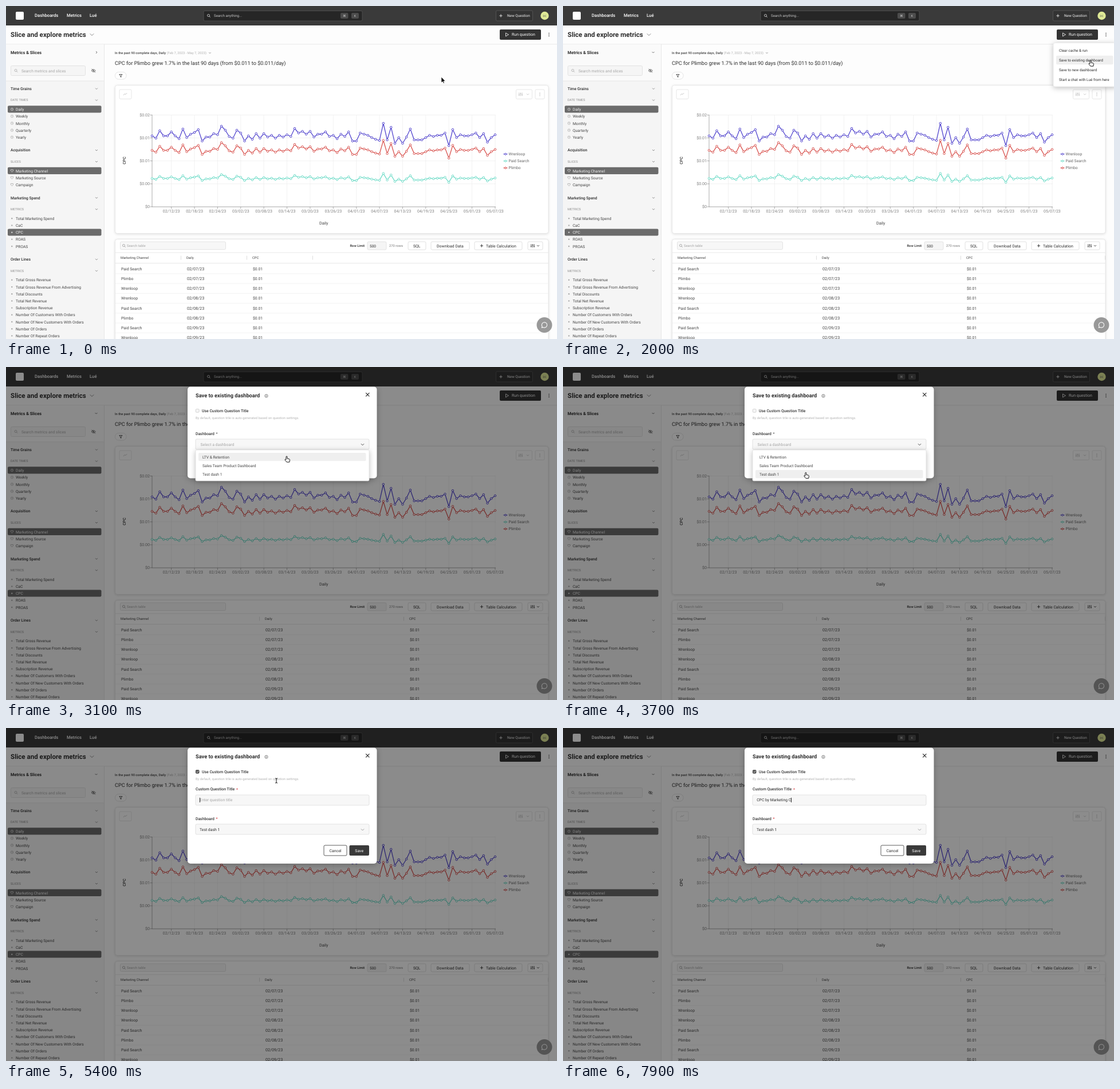
An HTML page for the animation above (8 s loop, 962x582 px).

```html
<!DOCTYPE html>
<html lang="en">
<head>
<meta charset="utf-8">
<title>Save to dashboard</title>
<style>
html, body { margin: 0; width: 100%; height: 100%; overflow: hidden; background: #fff; }
svg { display: block; }
text { font-family: Roboto, Inter, sans-serif; white-space: pre; text-rendering: geometricPrecision; }
.card { filter: drop-shadow(0 1px 2px rgba(0,0,0,.12)); }
.pop { filter: drop-shadow(0 2px 5px rgba(0,0,0,.25)); }
</style>
</head>
<body>
<svg id="stage" width="962" height="582" viewBox="0 0 962 582"></svg>
<script>
const INK = '#2d2d2d', GREY = '#a5a5a5', LINE = '#e2e2e2';

// y is the middle of the capital letters
const T = (s, x, y, size = 6.75, fill = '#454545', weight = 400, anchor = 'start') =>
  `<text x="${x}" y="${y + size * .355}" font-size="${size}" fill="${fill}" font-weight="${weight}" text-anchor="${anchor}">${s.replace('&', '&amp;')}</text>`;
const R = (x, y, w, h, fill, stroke = 'none', rx = 2, cls = '') =>
  `<rect x="${x}" y="${y}" width="${w}" height="${h}" rx="${rx}" fill="${fill}" stroke="${stroke}" stroke-width=".8" class="${cls}"/>`;
const P = (d, stroke, width = .8, fill = 'none') =>
  `<path d="${d}" stroke="${stroke}" stroke-width="${width}" fill="${fill}"/>`;
const C = (x, y, r, fill, stroke = 'none', width = .8) =>
  `<circle cx="${x}" cy="${y}" r="${r}" fill="${fill}" stroke="${stroke}" stroke-width="${width}"/>`;
const G = (id, body) => `<g id="${id}">${body}</g>`;

const chevron = (x, y, c = '#777', s = 2) => P(`M${x - s} ${y - s / 2}l${s} ${s} ${s} ${-s}`, c);
const lens = (x, y, c) => C(x, y, 2, 'none', c) + P(`M${x + 1.5} ${y + 1.5}l1.8 1.8`, c);
const kebab = (x, y, c) => [-2.4, 0, 2.4].map(d => C(x, y + d, .75, c)).join('');
const plus = (x, y, c) => P(`M${x - 2.6} ${y}h5.2M${x} ${y - 2.6}v5.2`, c, .9);
const sliders = (x, y, c) => P(`M${x - 2.6} ${y - 3}v6M${x} ${y - 3}v6M${x + 2.6} ${y - 3}v6M${x - 3.6} ${y + 1}h2M${x - 1} ${y - 1}h2M${x + 1.6} ${y + 1}h2`, c);

function header() {
  return R(0, 0, 962, 34, '#3a3a3a', 'none', 0) + R(17, 10, 14, 14, '#fff')
    + T('Dashboards', 50, 16.5, 7.7, '#fff', 500) + T('Metrics', 106, 16.5, 7.7, '#fff', 500)
    + T('Lué', 146, 16.5, 7.7, '#fff', 500)
    + R(345, 8.5, 277, 17.5, '#262626', '#555') + lens(353.5, 16.5, '#ddd')
    + T('Search anything...', 363, 17, 6.2, '#c4c4c4')
    + R(584, 12, 13.5, 10, '#4c4c4c') + R(603, 12, 13, 10, '#4c4c4c')
    + T('⌘', 590.7, 17, 5.5, '#ccc', 400, 'middle') + T('K', 609.5, 17, 5.2, '#ccc', 400, 'middle')
    + R(855.5, 8, 64, 18, '#333', '#595959') + plus(864, 17, '#eee') + T('New Question', 875, 17, 6.4, '#f2f2f2')
    + C(940.5, 17, 7.2, '#dfe996') + T('DC', 940.5, 17, 4.6, '#555', 400, 'middle')
    + T('Slice and explore metrics', 8, 50, 11.6, INK, 600) + chevron(150, 50, '#666', 3.2)
    + R(862, 41, 72, 18, '#333') + P('M872.5 47l5 3-5 3z', '#fff') + T('Run question', 883, 50, 7, '#fff', 400)
    + kebab(948, 50, '#333') + P('M0 66.8H962', LINE);
}

const sections = [
  [144.5, 'Time Grains', 'DATE TIMES', 0, ['Daily', 'Weekly', 'Monthly', 'Quarterly', 'Yearly']],
  [252, 'Acquisition', 'SLICES', 0, ['Marketing Channel', 'Marketing Source', 'Campaign']],
  [335.2, 'Marketing Spend', 'METRICS', 2, ['Total Marketing Spend', 'CaC', 'CPC', 'ROAS', 'PROAS']],
  [442.8, 'Order Lines', 'METRICS', -1, ['Total Gross Revenue', 'Total Gross Revenue From Advertising', 'Total Discounts',
    'Total Net Revenue', 'Subscription Revenue', 'Number Of Customers With Orders',
    'Number Of New Customers With Orders', 'Number Of Orders', 'Number Of Repeat Orders']]
];

function sidebar() {
  let s = R(0, 67, 171, 515, '#f5f5f5', 'none', 0) + R(0, 67, 171, 64, '#fafafa', 'none', 0)
    + P('M171.5 67V582M0 131H171', LINE)
    + T('Metrics & Slices', 8, 81, 7.4, INK, 600)
    + G('shut', P('M157 79l2 2-2 2', '#555')) + G('open', chevron(157.5, 81, '#555'))
    + R(8.5, 104.5, 130, 17, '#f5f5f5', '#ddd') + lens(17, 112.5, '#aaa')
    + T('Search metrics and slices', 27, 113.3, 6.8, GREY)
    + P('M149 113q3.700 -4.500 7.400 0q-3.700 4.500 -7.400 0M149.500 109.800l6.500 6.500', '#555') + C(152.7, 113, 1.1, 'none', '#555');
  sections.forEach(([y, head, mini, chosen, items], k) => {
    s += T(head, 8, y, 6.8, INK, 500) + chevron(158, y) + T(mini, 8, y + 20, 5.5, '#8c8c8c') + chevron(158, y + 20);
    items.forEach((name, i) => {
      const iy = y + 36 + 12.2 * i, on = i === chosen, c = on ? '#ddd' : '#aaa';
      if (on) s += R(3, iy - 6.2, 163.5, 12.2, '#6b6b6b');
      s += k === 0 ? C(10.5, iy, 2.2, 'none', c, .7) + P(`M10.5 ${iy - 1.3}v1.500h1`, c, .6)
        : k === 1 ? P(`M8.300 ${iy - 2}h4.200v2l-2 2.200-2.200-2.200z`, c, .8)
        : C(10.3, iy, 1.2, c);
      s += T(name, 17, iy + .3, 6.72, on ? '#f4f4f4' : '#454545');
    });
  });
  return s;
}

// heights of the top curve; the two others are the same curve scaled to the axis
const curve = [227, 231, 218, 227, 227, 220, 227, 232, 215, 230, 224, 221, 216, 236, 229, 229, 223, 225, 210, 217,
  228, 231, 217, 222, 236, 227, 233, 223, 231, 223, 229, 226, 231, 226, 229, 225, 228, 214, 222, 219,
  224, 219, 229, 224, 224, 220, 228, 226, 232, 224, 228, 220, 236, 236, 222, 224, 226, 230, 233, 235,
  205, 234, 212, 240, 230, 240, 229, 215, 234, 234, 234, 230, 226, 228, 226, 226, 222, 244, 216, 230,
  225, 227, 227, 225, 222, 230, 223, 238, 230, 225];
const series = [['Wrenloop', '#5548cf', 1], ['Paid Search', '#6edcc8', .4], ['Plimbo', '#d9534f', .796]];
const dayX = i => 255 + 6.73 * i;

function chart() {
  let s = R(190.5, 138.5, 756.5, 259, '#fff', LINE, 4, 'card')
    + R(198, 146, 21, 16.5, '#fff', '#e0e0e0') + P('M205 156l2-2.500 2 1 2.200-2.500', '#bbb')
    + R(890.5, 146, 28, 16.5, '#fff', '#e0e0e0') + sliders(898.5, 154.3, '#bbb') + chevron(911, 154.3, '#bbb')
    + R(924, 146, 16, 16.5, '#fff', '#e0e0e0') + kebab(932, 154.3, '#bbb');
  ['$0.02', '$0.01', '$0.01', '$0.00', '$0'].forEach((label, i) => {
    const y = 190.5 + 40.1 * i;
    s += P(`M255 ${y}H855`, '#ececec', .7) + P(`M251.500 ${y}h4`, '#999') + T(label, 251, y, 7.1, '#808080', 400, 'end');
  });
  for (let i = 5; i < 90; i += 6) {
    const x = dayX(i), date = new Date(Date.UTC(2023, 1, 7 + i)).toISOString();
    s += P(`M${x} 190.500V351`, '#ececec', .7) + P(`M${x} 351v3.500`, '#999')
      + T(date.slice(5, 10).replace('-', '/') + '/23', x, 358.3, 7.1, '#808080', 400, 'middle');
  }
  s += P('M255 190.500V351H855', '#999') + T('Daily', 554.7, 379.5, 7.2, '#444', 400, 'middle')
    + `<g transform="translate(207 270) rotate(-90)">${T('CPC', 0, 0, 6.9, '#333', 500, 'middle')}</g>`;
  series.forEach(([name, color, k], n) => {
    const pts = curve.map((y, i) => [dayX(i), 351 - (351 - y) * k]);
    s += P('M' + pts.join('L'), color, 1.3) + pts.map(([x, y]) => C(x, y, 1.75, '#fff', color, 1)).join('');
    const y = 258.8 + 12.1 * n;
    s += P(`M868.500 ${y}h7`, color, 1.2) + C(872, y, 1.5, '#fff', color, 1) + T(name, 877.5, y, 6.8, '#666');
  });
  return s;
}

function columns(id, step) {
  let s = ['Marketing Channel', 'Daily', 'CPC'].map((name, i) =>
    T(name, 200 + step * i, 440.3, 5.9, '#444') + P(`M${190.5 + step * (i + 1)} 436.500v7`, '#d5d5d5')).join('');
  [1, 2, 0, 0, 1, 2, 1, 0].forEach((n, i) => {
    const y = 459.2 + 17.24 * i;
    [series[n][0], `02/0${7 + Math.floor(i / 3)}/23`, '$0.01'].forEach((v, c) => {
      s += T(v, 201 + step * c, y, c === 1 ? 7.2 : 6.85);
    });
  });
  return G(id, s);
}

function table() {
  const button = (x, w, label, tx) => R(x, 412, w, 14, '#fff', '#d8d8d8') + T(label, tx, 419.3, 6.9, INK);
  let s = R(190.5, 407.5, 756.5, 190, '#fff', LINE, 4, 'card')
    + R(199.5, 412, 184, 13.5, '#f7f7f7', '#ddd') + lens(205.5, 418.5, '#999') + T('Search table', 211, 419.3, 5.9, GREY)
    + T('Row Limit', 600.5, 419.3, 5.8, INK, 500) + R(631, 412, 33, 14, '#f5f5f5', '#ddd') + T('500', 635, 419.3, 6.5, INK)
    + T('270 rows', 669, 419.3, 5.85, '#777')
    + button(702, 31, 'SQL', 711) + button(742, 67, 'Download Data', 752)
    + button(818, 83, 'Table Calculation', 838) + plus(830.5, 419, INK)
    + button(911, 26, '', 0) + sliders(919.5, 419, '#333') + chevron(929, 419, '#333')
    + P('M191 431H947M191 449.500H947', LINE);
  for (let y = 467.8; y < 582; y += 17.24) s += P(`M191 ${y}H947`, '#f0f0f0');
  return s + columns('narrow', 115) + columns('wide', 252);
}

function page() {
  return R(0, 0, 962, 582, '#fdfdfd', 'none', 0) + header() + sidebar()
    + T('In the past 90 complete days, Daily', 190, 81.7, 5.72, '#444', 500)
    + T('(Feb 7, 2023 - May 7, 2023)', 280.5, 81.7, 5.8, '#b0b0b0') + chevron(356, 82, '#777', 1.6)
    + T('CPC for Plimbo grew 1.7% in the last 90 days (from $0.011 to $0.011/day)', 190, 99.8, 9.15, INK, 400)
    + R(190.5, 115.5, 19.5, 12.5, '#fff', '#ddd', 6) + P('M197.800 119.500h5.200l-2 2.500v2.500l-1.200-.8v-1.700z', '#333')
    + chart() + table()
    + C(940, 557.5, 13.5, '#999') + P('M940 552.700a4.700 4.700 0 1 1-2.300 8.800l-2.200.600.600-2.200a4.700 4.700 0 0 1 3.900-7.200z', '#fff', 1.1);
}

const actions = ['Clear cache & run', 'Save to existing dashboard', 'Save to new dashboard', 'Start a chat with Lué from here'];
const menu = () => R(856, 64.5, 110, 76.5, '#fff', '#e8e8e8', 3, 'pop')
  + `<rect id="hover" x="861" width="99.500" height="15.500" rx="2" fill="#efefef"/>`
  + actions.map((a, i) => T(a, 866, 77.5 + 17 * i, 6.42, INK, 400)).join('');

function dialog(tall) {
  const dy = tall ? 42 : 0, star = tall ? '#d8343a' : '#555';
  let s = R(317, 34.5, 330.5, 160 + dy + (tall ? .5 : 0), '#fff', 'none', 5, 'pop')
    + T('Save to existing dashboard', 331, 50, 9.25, INK, 600)
    + C(454.5, 50.5, 2.6, 'none', '#444', .7) + P('M454.500 50v1.800M454.500 48.800v.7', '#444', .7)
    + P('M628.200 45.200l6.200 6.200m0-6.200l-6.200 6.200', '#222', 1.1)
    + R(331.3, 73.5, 5.8, 5.8, tall ? '#555' : '#f5f5f5', tall ? '#555' : '#ccc', 1.3)
    + (tall ? P('M332.600 76.500l1.200 1.200 2.200-2.500', '#fff', .8) : '')
    + T('Use Custom Question Title', 342, 76.8, 6.85, '#333', 500)
    + T('By default, question title is auto-generated based on question settings.', 331, 89.3, 5.8, '#b5b5b5')
    + T('Dashboard', 331, 116.3 + dy, 6.8, '#333', 500) + T('*', 366.5, 116.8 + dy, 7, star)
    + R(331, 126, 303, 18, '#f7f7f7', '#dcdcdc')
      .replace('y="126"', `y="${126 + dy}"`)
    + R(555, 163 + dy, 40, 18, '#fff', '#333') + T('Cancel', 575, 172.2 + dy, 6.9, INK, 400, 'middle')
    + R(599.5, 163 + dy, 34.5, 18, '#3a3a3a') + T('Save', 616.7, 172.2 + dy, 6.9, '#fff', 400, 'middle');
  if (!tall) return s + G('empty', T('Select a dashboard', 339.5, 135.5, 6.9, GREY)) + G('picked', T('Test dash 1', 338, 135.5, 6.85, INK))
    + G('calm', chevron(622.5, 135.5, '#777', 2.6)) + G('active', chevron(622.5, 135.5, '#222', 2.6));
  return s + T('Test dash 1', 338, 177.7, 6.85, INK) + chevron(622.5, 177.7, '#888', 2.6)
    + T('Custom Question Title', 331, 107, 6.85, '#333', 500) + T('*', 402, 107.5, 7, star)
    + R(331, 117, 303, 18, '#f7f7f7', '#dcdcdc')
    + G('hint', T('Enter question title', 338.3, 126, 6.85, GREY))
    + `<text id="typed" x="338.200" y="128.400" font-size="6.800" fill="${INK}"></text>`
    + R(338, 121.8, .9, 8.2, '#111', 'none', 0).replace('<rect', '<rect id="caret"');
}

const options = () => R(331, 145, 303, 54, '#fff', '#e0e0e0', 2, 'pop')
  + `<rect id="choice" x="336" width="292.500" height="14.200" rx="2" fill="#efefef"/>`
  + ['LTV & Retention', 'Sales Team Product Dashboard', 'Test dash 1'].map((o, i) => T(o, 343, 157.3 + 15 * i, 6.7)).join('');

const pointers = {
  arrow: P('M0 0V10l2.300-2 1.500 3.300 1.600-.7-1.500-3.200h3.100z', '#fff', .7, '#000'),
  hand: P('M-1 1c0-1.400 2-1.400 2 0v3l3.400.8c.8.200 1.200.8 1.100 1.600l-.6 3.800h-4.800l-2.900-3.600c-.7-1 .4-1.800 1.300-1l.5.5z', '#000', .9, '#fff'),
  beam: P('M-2-4.200q2 0 2 1.200q0-1.200 2-1.200M0-3.500V3.500M-2 4.200q2 0 2-1.200q0 1.200 2 1.200', '#111', 1)
};

stage.innerHTML = page() + G('menu', menu()) + `<rect id="shade" width="962" height="582" fill="#000" opacity=".45"/>`
  + G('modal', G('short', dialog(false)) + G('tall', dialog(true)) + G('options', options()))
  + G('pointer', Object.keys(pointers).map(k => G(k, pointers[k])).join(''));

const el = id => document.getElementById(id);
const show = (id, on) => el(id).setAttribute('display', on ? 'inline' : 'none');

// time, x, y, pointer shape from then on
const path = [
  [0, 760, 124, 'arrow'], [100, 760, 124, 'arrow'], [1000, 947, 49, 'hand'], [1400, 947, 49, 'hand'],
  [1700, 921, 95, 'hand'], [2200, 921, 95, 'hand'], [2300, 921, 94, 'arrow'], [2700, 490, 134, 'hand'],
  [2800, 490, 134, 'hand'], [3100, 490, 156, 'hand'], [3800, 420, 186, 'hand'], [4000, 420, 186, 'hand'],
  [4500, 334, 74, 'hand'], [4900, 334, 75, 'hand'], [5000, 415, 124, 'beam'], [5100, 415, 124, 'beam'],
  [5400, 472, 92, 'beam'], [8000, 472, 92, 'beam']
];
const title = 'CPC by Marketing C';
const typing = [[6000, 1], [6300, 2], [6400, 3], [6800, 5], [6900, 6], [7000, 8], [7100, 10],
  [7300, 11], [7400, 12], [7500, 13], [7600, 14], [7700, 16], [7900, 18]];

function pointerAt(t) {
  const i = path.findIndex(p => p[0] > t) - 1, [t0, x0, y0, shape] = path[i], [t1, x1, y1] = path[i + 1];
  const u = (t - t0) / (t1 - t0), k = u * u * (3 - 2 * u);
  return [x0 + (x1 - x0) * k, y0 + (y1 - y0) * k, shape];
}

function draw(t) {
  const within = (a, b) => t >= a && t < b;
  const [x, y, shape] = pointerAt(t);
  el('pointer').setAttribute('transform', `translate(${x} ${y})`);
  show('pointer', t < 6000);
  for (const k in pointers) show(k, k === shape);

  show('narrow', t < 200);
  show('wide', t >= 200);
  show('shut', t < 200);
  show('open', t >= 200);

  show('menu', within(1000, 2300));
  show('hover', y > 66);
  el('hover').setAttribute('y', y > 85 ? 86.7 : 69.7);

  const tall = t >= 4700, entering = t < 2400;
  show('shade', t >= 2300);
  show('modal', t >= 2300);
  el('modal').setAttribute('opacity', entering ? .95 : 1);
  el('modal').setAttribute('transform', entering ? 'translate(482 115) scale(.996) translate(-482 -115)' : '');
  show('short', !tall);
  show('tall', tall);
  show('options', within(2800, 3900));
  show('choice', y > 149);
  el('choice').setAttribute('y', 150 + 15 * Math.max(0, Math.min(2, Math.floor((y - 149) / 15))));
  show('empty', t < 3900);
  show('picked', t >= 3900);
  show('calm', t < 2800);
  show('active', t >= 2800);

  const count = typing.reduce((n, [at, c]) => t >= at ? c : n, 0);
  show('hint', !count);
  el('typed').textContent = title.slice(0, count);
  show('caret', within(5200, 5600) || within(5800, 6600) || t >= 6800);
  if (tall) el('caret').setAttribute('x', 338 + (count ? el('typed').getComputedTextLength() : 0));
}

const start = performance.now();
(function tick() {
  draw(Math.floor((performance.now() - start) % 8000 / 100) * 100);
  requestAnimationFrame(tick);
})();
</script>
</body>
</html>
```
